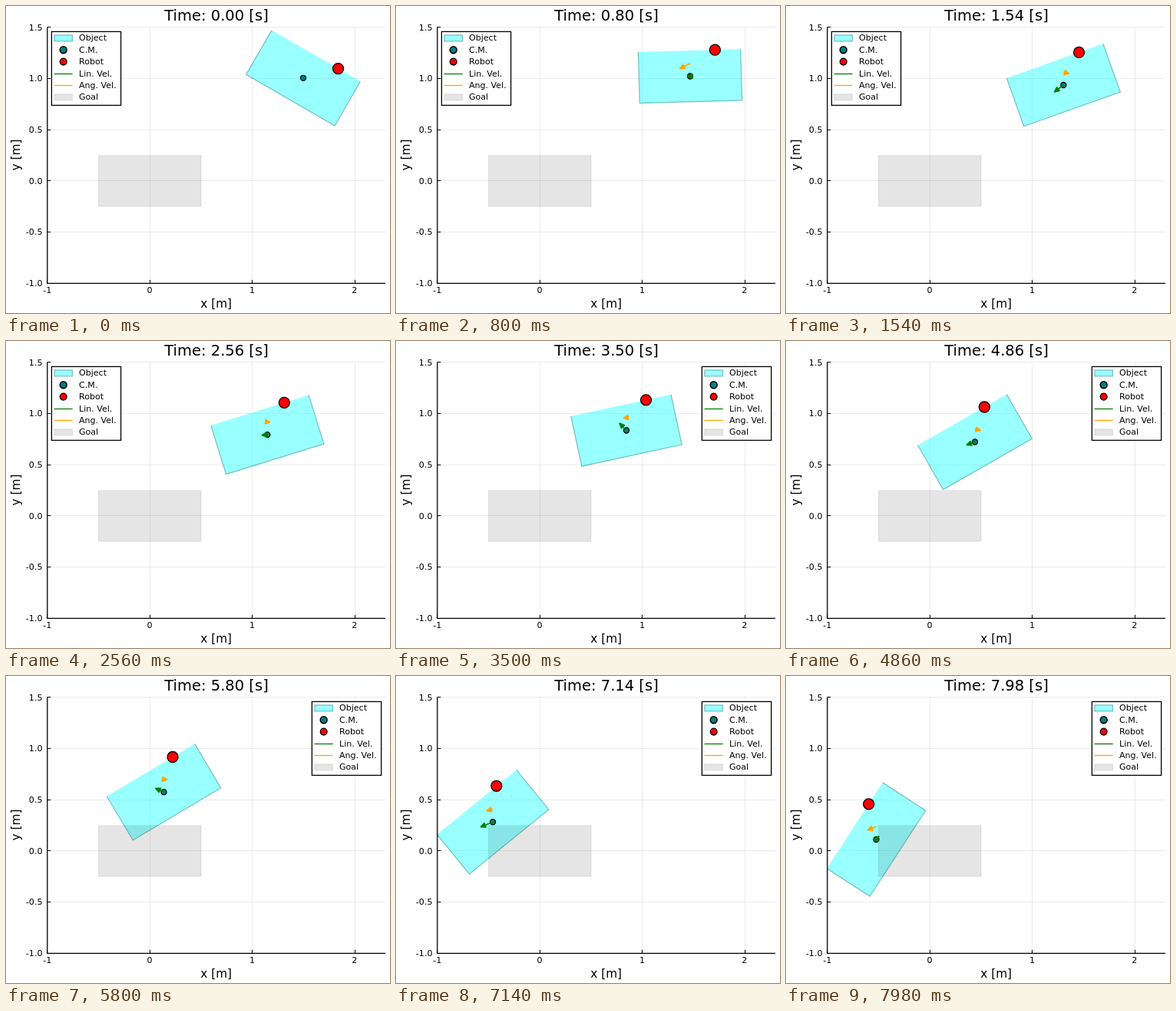
These frames come from a looping animation (500x400 px, 8 s). An HTML page with a canvas:

```html
<!DOCTYPE html>
<html>
<head>
<meta charset="utf-8">
<style>
  html, body { margin: 0; width: 100%; height: 100%; overflow: hidden; background: #fff; }
  canvas { display: block; }
</style>
</head>
<body>
<canvas id="stage" width="500" height="400"></canvas>
<script>
const ctx = document.getElementById("stage").getContext("2d");
const UNIT = 133.4;
const LEFT = 53.8, RIGHT = 494, TOP = 27.4, BOTTOM = 361.3;
const FONT = '"DejaVu Sans", sans-serif';
const GREEN = "#008000", ORANGE = "#ffa500";
const OBJECT_STYLE = ["rgba(0,255,255,.4)", "rgba(0,100,100,.4)"];
const GOAL_STYLE = ["rgba(0,0,0,.1)", "rgba(0,0,0,.08)"];

const toX = x => 187.3 + x * UNIT;
const toY = y => 227.7 - y * UNIT;
const crisp = v => Math.floor(v) + 0.5;
const radians = degrees => degrees * Math.PI / 180;

// Key poses: centre in px, tilt in degrees, and their rates per second
const pose = (t, x, y, tilt, vx = 0, vy = 0, spin = 0) => ({ t, at: [x, y, tilt], rate: [vx, vy, spin] });
const POSES = [
  pose(0, 387, 93.8, -30),
  pose(1.54, 361.3, 103, 19.6, -48, 36, -27),
  pose(2.5, 342, 122, 18, -25, 0, -12),
  pose(3.5, 300, 116.5, 12.2, -36, -38, 14),
  pose(4.86, 246, 131.5, 29.8, -44, 16, -27),
  pose(5.8, 205.5, 151.2, 30.8, -44, -20, -16),
  pose(7.14, 126.1, 190.2, 39.2, -64, 26, 30),
  pose(7.98, 117.5, 213, 57, 14, -18, 43)
];

// Cubic Hermite between neighbouring poses: [value, rate] for x, y and tilt
function motionAt(t) {
  const next = Math.max(1, POSES.findIndex(p => p.t >= t));
  const from = POSES[next - 1], to = POSES[next];
  const span = to.t - from.t, s = (t - from.t) / span, r = 1 - s;
  return from.at.map((a, k) => {
    const d = to.at[k] - a, p = from.rate[k] * span, q = to.rate[k] * span;
    return [
      a + d * s * s * (3 - 2 * s) + p * s * r * r - q * s * s * r,
      (6 * d * s * r + p * r * (1 - 3 * s) + q * s * (3 * s - 2)) / span
    ];
  });
}

function line(color, width, ...points) {
  ctx.beginPath();
  points.forEach(([x, y]) => ctx.lineTo(x, y));
  ctx.strokeStyle = color;
  ctx.lineWidth = width;
  ctx.stroke();
}

// Filled box whose top edge has no outline unless closed
function box(x, y, angle, w, h, [fill, stroke], closed) {
  ctx.save();
  ctx.translate(x, y);
  ctx.rotate(angle);
  ctx.beginPath();
  ctx.moveTo(-w / 2, -h / 2);
  ctx.lineTo(-w / 2, h / 2);
  ctx.lineTo(w / 2, h / 2);
  ctx.lineTo(w / 2, -h / 2);
  if (closed) ctx.closePath();
  ctx.fillStyle = fill;
  ctx.fill();
  ctx.strokeStyle = stroke;
  ctx.lineWidth = 1.25;
  ctx.stroke();
  ctx.restore();
}

function dot(x, y, r, fill, width = 1.3) {
  ctx.beginPath();
  ctx.arc(x, y, r, 0, 7);
  ctx.fillStyle = fill;
  ctx.fill();
  ctx.strokeStyle = "#000";
  ctx.lineWidth = width;
  ctx.stroke();
}

function text(str, x, y, size, align = "center") {
  ctx.font = `${size}px ${FONT}`;
  ctx.textAlign = align;
  ctx.fillStyle = "#000";
  ctx.fillText(str, x, y);
}

// The head keeps its size, however short the shaft
function arrow(color, x, y, dx, dy) {
  const length = Math.hypot(dx, dy);
  if (length < 0.1) return;
  ctx.save();
  ctx.translate(x, y);
  ctx.rotate(Math.atan2(dy, dx));
  ctx.lineJoin = "round";
  line(color, 1.6, [0, 0], [length, 0]);
  line(color, 1.4, [length, 0], [length - 6.5, -3], [length - 6.5, 3], [length, 0]);
  ctx.fillStyle = color;
  ctx.fill();
  ctx.restore();
}

function drawGrid() {
  for (let x = 0; x <= 2; x++) line("rgba(0,0,0,.08)", 1, [crisp(toX(x)), TOP], [crisp(toX(x)), BOTTOM]);
  for (let y = -0.5; y <= 1.5; y += 0.5) line("rgba(0,0,0,.08)", 1, [LEFT, crisp(toY(y))], [RIGHT, crisp(toY(y))]);
}

function drawAxes(t) {
  line("#000", 1.3, [LEFT, TOP], [LEFT, BOTTOM], [RIGHT, BOTTOM]);
  for (let x = -1; x <= 2; x++) {
    line("#000", 1, [crisp(toX(x)), BOTTOM], [crisp(toX(x)), BOTTOM - 4.5]);
    text(x, toX(x) - 0.2, 374, 11.1);
  }
  for (let y = -1; y <= 1.5; y += 0.5) {
    line("#000", 1, [LEFT, crisp(toY(y))], [LEFT + 4.5, crisp(toY(y))]);
    text(y.toFixed(1), 47.5, toY(y) + 4, 11.1, "right");
  }
  text(`Time: ${t.toFixed(2)} [s]`, 274, 19.3, 19.5);
  text("x [m]", 273.7, 393, 15.3);
  ctx.save();
  ctx.translate(17.5, 194);
  ctx.rotate(-Math.PI / 2);
  text("y [m]", 0, 0, 15.3);
  ctx.restore();
}

function drawLegend(x) {
  const mid = x + 15.3;
  const sample = (color, y) => line(color, 1.3, [mid - 12, crisp(y)], [mid + 12, crisp(y)]);
  const rows = {
    "Object": y => box(mid, y, 0, 23.5, 8, OBJECT_STYLE, true),
    "C.M.": y => dot(mid, y, 4.4, "#008080", 1.6),
    "Robot": y => dot(mid, y, 4.4, "#f00"),
    "Lin. Vel.": y => sample(GREEN, y),
    "Ang. Vel.": y => sample(ORANGE, y),
    "Goal": y => box(mid, y, 0, 23.5, 8, GOAL_STYLE, true)
  };
  ctx.fillStyle = "#fff";
  ctx.fillRect(x, 33.4, 90.2, 96);
  ctx.strokeStyle = "#000";
  ctx.lineWidth = 1.3;
  ctx.strokeRect(x, 33.4, 90.2, 96);
  Object.entries(rows).forEach(([name, drawSample], i) => {
    const y = 41.8 + 15.4 * i;
    drawSample(y);
    text(name, x + 35.6, y + 3.5, 11.05, "left");
  });
}

function drawScene(t) {
  const [[cx, vx], [cy, vy], [tilt, spin]] = motionAt(t);
  const angle = radians(-tilt), turn = radians(-spin);
  const c = Math.cos(angle), s = Math.sin(angle), arm = UNIT / 4, radius = UNIT / 8;

  ctx.save();
  ctx.beginPath();
  ctx.rect(LEFT, TOP, RIGHT - LEFT, BOTTOM - TOP);
  ctx.clip();
  box(cx, cy, angle, UNIT, UNIT / 2, OBJECT_STYLE);
  dot(cx, cy, 3.5, "#008080");
  dot(cx + arm * (c + s), cy + arm * (s - c), 7, "#f00");
  arrow(GREEN, cx, cy, vx / 4, vy / 4);
  arrow(ORANGE, cx, cy - radius, radius * Math.sin(turn), radius * (1 - Math.cos(turn)));
  box(toX(0), toY(0), 0, UNIT, UNIT / 2, GOAL_STYLE);
  ctx.restore();
}

function frame() {
  const t = Math.floor(performance.now() % 8000 / 20) * 0.02;
  ctx.fillStyle = "#fff";
  ctx.fillRect(0, 0, 500, 400);
  drawGrid();
  drawScene(t);
  drawAxes(t);
  drawLegend(t < 2.8 ? 59.4 : 398.4);
  requestAnimationFrame(frame);
}
frame();
</script>
</body>
</html>
```
